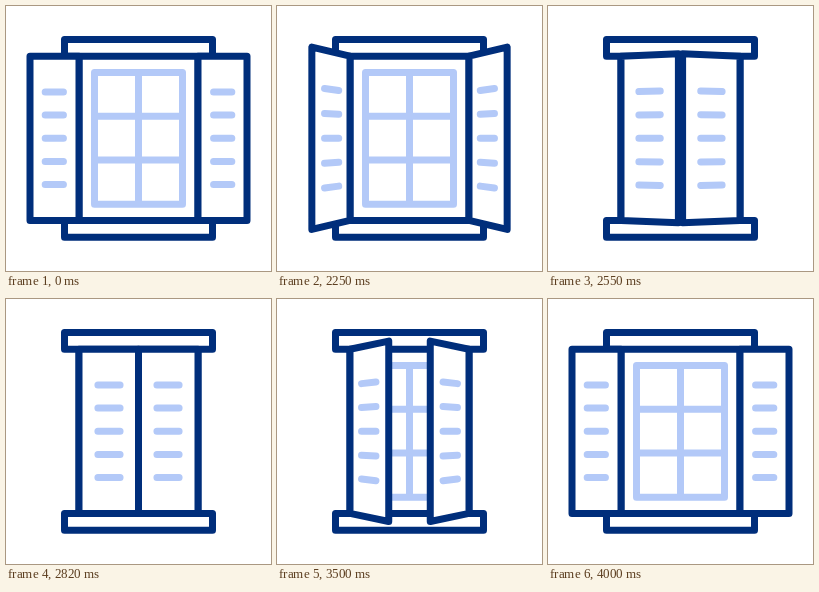
These frames come from a looping animation (265 px wide and 265 px high, 4020 ms). An HTML page:

```html
<!DOCTYPE html>
<html lang="en">
<head>
<meta charset="utf-8">
<title>Window shutters</title>
<style>
  html, body { margin: 0; width: 100%; height: 100%; overflow: hidden; background: #fff; }
  svg { display: block; width: 100%; height: 100%; }
  path { stroke-width: 7; stroke-linecap: round; stroke-linejoin: round; }
  .dark { fill: #fff; stroke: #002e7b; }
  .light { fill: none; stroke: #b3c9f8; }
</style>
</head>
<body>
<svg viewBox="0 0 265 265">
  <path class="dark" d="M58.5 33.5H206.5V50.2H58.5ZM58.5 214.4H206.5V231.3H58.5ZM73 50.2H192V214.4H73Z"/>
  <path class="light" d="M88.5 66.5H176.5V198.3H88.5ZM132.5 66.5V198.3M88.5 110.3H176.5M88.5 154H176.5"/>
  <g id="shutters"></g>
</svg>
<script>
const LOOP = 4020;
const CLOSE = { start: 2020, length: 800 };
const OPEN = { start: 3320, length: 680 };
const CENTER = { x: 132.5, y: 132.3 };
const HALF_WIDTH = 59.5;
const HALF_HEIGHT = 82.1;
const OPEN_WIDTH = 49;
const CAMERA = 442;
const SLATS = [-46.3, -23.2, 0, 23.2, 46.3];

const group = document.getElementById('shutters');

function addPath(className) {
  const path = document.createElementNS('http://www.w3.org/2000/svg', 'path');
  path.setAttribute('class', className);
  return group.appendChild(path);
}

const shutters = [-1, 1].map(side => ({ side, panel: addPath('dark'), slats: addPath('light') }));

// Cubic Bezier easing with control points (x1, 0) and (x2, 1).
function ease(x, x1 = 0.467, x2 = 0.116) {
  if (x <= 0) return 0;
  if (x >= 1) return 1;
  let low = 0, high = 1;
  for (let i = 0; i < 24; i++) {
    const s = (low + high) / 2, r = 1 - s;
    if (3 * r * r * s * x1 + 3 * r * s * s * x2 + s * s * s < x) low = s;
    else high = s;
  }
  return low * low * (3 - 2 * low);
}

const progress = (t, phase) => ease((t - phase.start) / phase.length);

function draw(t) {
  const closed = progress(t, CLOSE) - progress(t, OPEN);
  const angle = Math.PI * closed;
  const width = OPEN_WIDTH + (HALF_WIDTH - OPEN_WIDTH) * closed;

  for (const { side, panel, slats } of shutters) {
    // u runs from the hinge (0) to the free edge (1).
    const project = (u, y) => {
      const scale = 1 / (1 - u * width * Math.sin(angle) / CAMERA);
      const x = HALF_WIDTH + u * width * Math.cos(angle);
      return `${(CENTER.x + side * x * scale).toFixed(2)} ${(CENTER.y + y * scale).toFixed(2)}`;
    };
    const corners = [[0, -1], [1, -1], [1, 1], [0, 1]].map(([u, v]) => project(u, v * HALF_HEIGHT));
    panel.setAttribute('d', `M${corners.join('L')}Z`);
    slats.setAttribute('d', SLATS.map(y => `M${project(0.318, y)}L${project(0.69, y)}`).join(''));
  }
}

const begin = performance.now();
function tick() {
  draw((performance.now() - begin) % LOOP);
  requestAnimationFrame(tick);
}
tick();
</script>
</body>
</html>
```
